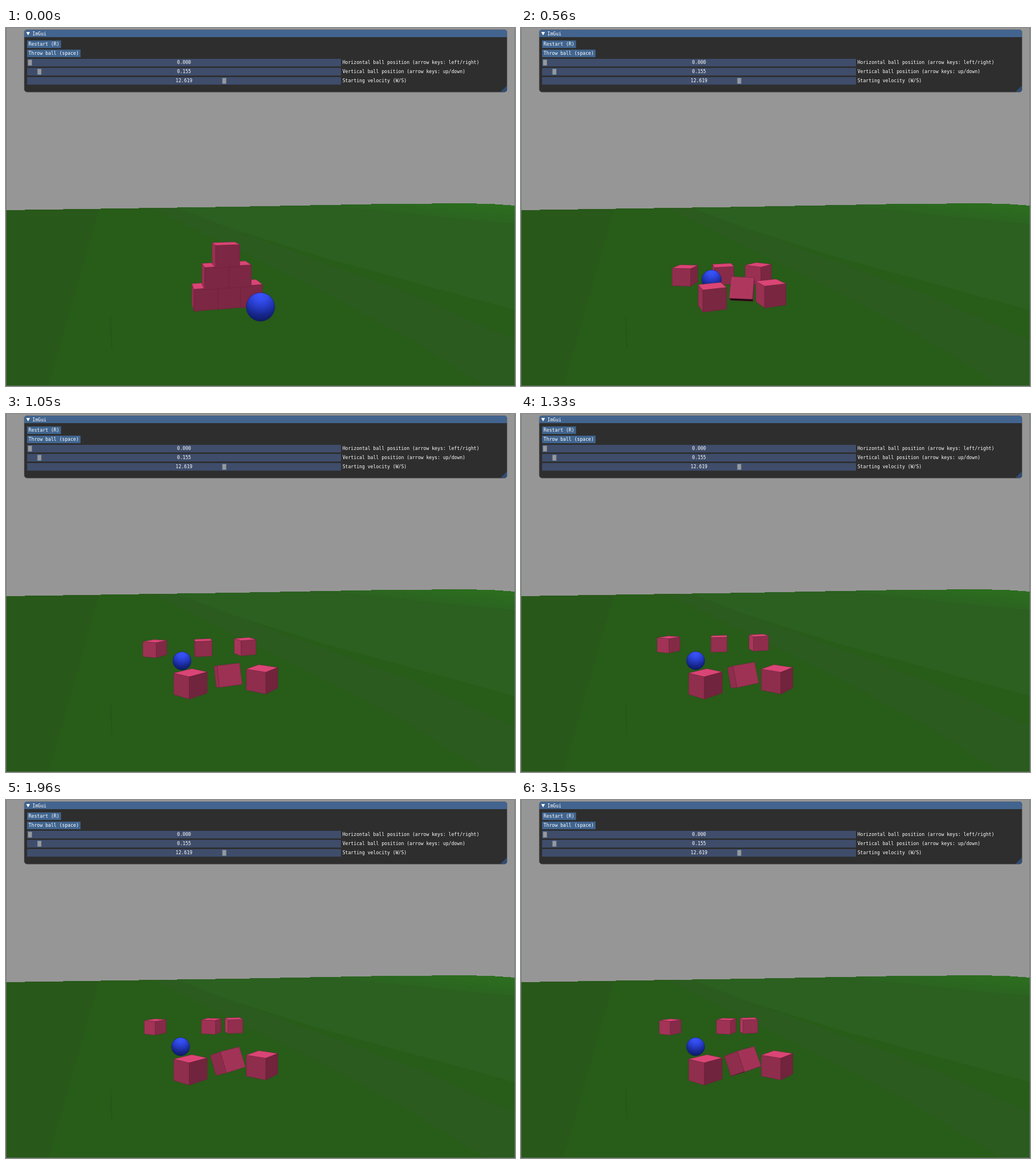
These frames come from a looping animation (892x627 px, 3.22 s). An HTML page with a canvas:

```html
<!DOCTYPE html>
<html lang="en">
<head>
<meta charset="utf-8">
<title>Ball and cubes</title>
<style>
  html, body { margin: 0; width: 100%; height: 100%; overflow: hidden; background: #969696; }
  svg, canvas { position: absolute; left: 0; top: 0; width: 892px; height: 627px; }
  text { font: 8.15px "DejaVu Sans Mono", "Liberation Mono", monospace; fill: #fff; white-space: pre; }
  .num { text-anchor: middle; }
  .button { fill: #41658f; }
  .track { fill: #3f4d6b; }
  .grab { fill: #999; stroke: #4a6c96; stroke-width: .7; }
</style>
</head>
<body>
<svg viewBox="0 0 892 627">
  <defs>
    <linearGradient id="hill" x1="0" y1="1" x2="1" y2="0">
      <stop offset=".35" stop-color="#2b6120"/>
      <stop offset="1" stop-color="#2c701f"/>
    </linearGradient>
  </defs>
  <rect width="892" height="627" fill="#969696"/>
  <g shape-rendering="crispEdges">
    <path fill="#285c19" d="M0 319L400 313L640 308.500L800 307L850 308L892 311V627H0Z"/>
    <path fill="#28581a" d="M0 319L163 317L75 627H0Z"/>
    <path fill="#2b6020" d="M290 315L400 313L640 308.500L800 307L892 311V494L560 403L400 353Z"/>
    <path fill="#2b5b1f" d="M258 316L300 315L400 353L560 412L720 470L892 547V627H840L700 540L560 465L400 387Z"/>
    <path fill="url(#hill)" d="M570 310L640 308.500L800 307L850 308L892 311V343L740 329Z"/>
  </g>
  <path stroke="#24521a" fill="none" d="M183.500 507L185.500 562"/>
  <path stroke="#65756a" stroke-opacity=".7" fill="none" d="M.5 0V626.500H891.500V0"/>

  <rect x="32" y="3" width="846" height="109.300" rx="5" fill="#2e2e2e" stroke="#555" stroke-width=".6"/>
  <path fill="#42648f" d="M32 16V8Q32 3 37 3H873Q878 3 878 8V16Z"/>
  <path fill="#fff" d="M35.500 7H42L38.750 13Z"/>
  <path fill="#304d73" d="M866.500 112L878 100.500V107.500Q878 112 873 112Z"/>
  <text x="46.300" y="12.700">ImGui</text>

  <rect class="button" x="37" y="21.800" width="59.400" height="13.200"/>
  <rect class="button" x="37" y="37.900" width="93.600" height="13.200"/>
  <text x="39.600" y="31.300">Restart (R)</text>
  <text x="39.600" y="47.300">Throw ball (space)</text>
  <g id="sliders"></g>
</svg>
<canvas id="scene" width="892" height="627"></canvas>

<script>
const sliders = [
  ['0.000', 38.6, 'Horizontal ball position (arrow keys: left/right)'],
  ['0.155', 55, 'Vertical ball position (arrow keys: up/down)'],
  ['12.619', 379, 'Starting velocity (W/S)']
];
document.getElementById('sliders').innerHTML = sliders.map(([value, grab, label], i) => `
  <g transform="translate(0 ${54 + i * 16})">
    <rect class="track" x="37" width="550" height="13.2"/>
    <rect class="grab" x="${grab}" y="1.4" width="7" height="10.4"/>
    <text class="num" x="312" y="9.3">${value}</text>
    <text x="589.7" y="9.3">${label}</text>
  </g>`).join('');

const ctx = document.getElementById('scene').getContext('2d');
const LOOP = 3220, STEP = 70;
const CX = 446, CY = 313, FOCAL = 560, UNIT = 40, FLAT = 0.91;
const HIT = 140, YAW = 17;

const progress = (t, from, to) => Math.min(1, Math.max(0, (t - from) / (to - from)));
const easeOut = (u, power) => 1 - (1 - u) ** power;
const mix = (a, b, u) => a + (b - a) * u;
const arc = u => 4 * u * (1 - u);
const ground = (x, z) => 3.81 - 0.03 * (x + 1.5) - 1.25 * (z - 1);

// Height of a thrown body above its resting place
function height(t, start, from, speed, gravity) {
  const s = Math.max(0, t - from) / 1000;
  return Math.max(0, start + speed * s - gravity * s * s);
}

// Lengths are in cube edges; z is the depth relative to UNIT pixels per edge.
function project(x, y, z) {
  const size = UNIT / z;
  return { x: CX + x * size, y: CY + y * size, size };
}

const stacked = (row, col) => ({
  x: -2.41 + 0.935 * (col + row / 2),
  z: 0.985 + 0.0075 * col - 0.01 * row,
  height: 0.92 * row
});

// Knocked away by the ball, sliding to rest along a bent path
function flung(row, col, end) {
  const start = stacked(row, col);
  return t => {
    const u = progress(t, HIT, 1960), slide = easeOut(u, 3);
    const x = mix(start.x, end.x, slide) + (end.bend || 0) * arc(u);
    const z = mix(start.z, end.z, easeOut(u, 2));
    const up = row && height(t, start.height, HIT, 1.6, 14);
    return {
      ...project(x, ground(x, z) - up, z),
      yaw: mix(YAW, end.yaw, slide) + (end.twist || 0) * arc(u)
    };
  };
}

// Pushed aside by the falling cubes
function nudged(col, end) {
  const start = stacked(0, col);
  return t => {
    const u = progress(t, 240, 840);
    const x = mix(start.x, end.x, u), z = mix(start.z, end.z, u);
    return { ...project(x, ground(x, z), z), yaw: mix(YAW, end.yaw, u ** 2.5) };
  };
}

// Tips forward off the top, lands on an edge and spins slowly
function toppled(t) {
  const start = stacked(2, 0);
  const u = progress(t, HIT, 620), settle = progress(t, 530, 3150);
  const x = start.x, z = mix(start.z, 1.025, u);
  const up = height(t, start.height, HIT, 1.6, 14);
  return {
    ...project(x, ground(x, z) - up - 0.08 * u, z),
    yaw: YAW * (1 - easeOut(u, 4)),
    pitch: mix(-90, -14, u),
    spin: 50 * easeOut(settle, 2),
    roll: mix(4 * u, -20, easeOut(settle, 3))
  };
}

function thrown(t) {
  const u = progress(t, 0, 1330);
  const x = mix(0, -4.375, easeOut(u, 2.5)), z = mix(0.8, 1.25, easeOut(u, 3));
  return project(x, 3.72 - height(t, 0.21, 0, 3.12, 6.25), z);
}

const cubes = [
  nudged(0, { x: -3, z: 0.98, yaw: 53 }),
  nudged(2, { x: 0.075, z: 1, yaw: 57 }),
  flung(0, 1, { x: -3.31, z: 1.54, yaw: -15, bend: -0.45, twist: 25 }),
  flung(1, 0, { x: -7.19, z: 1.56, yaw: -27 }),
  flung(1, 1, { x: -1.8, z: 1.54, yaw: YAW - 90, bend: 0.75 }),
  toppled
];

function turn(a, b, degrees) {
  const angle = degrees * Math.PI / 180, c = Math.cos(angle), s = Math.sin(angle);
  return [a * c - b * s, a * s + b * c];
}

function rotate([x, y, z], { spin = 0, pitch = 0, yaw = 0, roll = 0 }) {
  [x, z] = turn(x, z, spin);
  [y, z] = turn(y, z, pitch);
  [x, z] = turn(x, z, yaw);
  [x, y] = turn(x, y, roll);
  return [x, y, z];
}

const CORNERS = [[-1, -1], [1, -1], [1, 1], [-1, 1]];

function drawFace(pose, axis, side) {
  const place = (a, b) => {
    const v = [0, 0, 0];
    v[axis] = side;
    v[(axis + 1) % 3] = a;
    v[(axis + 2) % 3] = b;
    return rotate(v, pose);
  };
  const n = place(0, 0), half = pose.size / 2;
  const dx = pose.x - CX, dy = pose.y - CY;
  if (n[0] * dx + n[1] * dy + n[2] * FOCAL + half >= 0) return;

  ctx.beginPath();
  for (const [a, b] of CORNERS) {
    const p = place(a, b), zoom = FOCAL / (FOCAL + p[2] * half);
    ctx.lineTo(CX + (dx + p[0] * half) * zoom, CY + (dy + p[1] * half * FLAT) * zoom);
  }
  ctx.closePath();
  const haze = 0.007 * Math.max(0, UNIT - pose.size);
  const light = Math.min(1, 0.6 - 0.5 * n[1] - 0.1 * n[0] + haze);
  ctx.fillStyle = `rgb(${[218, 69, 117].map(c => Math.round(c * light))})`;
  ctx.fill();
  ctx.strokeStyle = 'rgba(105, 28, 60, .5)';
  ctx.lineWidth = 0.8;
  ctx.stroke();
}

function drawCube(pose) {
  for (let axis = 0; axis < 3; axis++) {
    drawFace(pose, axis, -1);
    drawFace(pose, axis, 1);
  }
}

function drawBall({ x, y, size }) {
  const r = size / 2;
  const shade = ctx.createRadialGradient(x, y - r * 0.85, 0, x, y - r * 0.85, r * 1.9);
  ['#3a54fa', '#324bea', '#2539c0', '#16268a', '#0d195e']
    .forEach((color, i) => shade.addColorStop(i / 4, color));
  ctx.beginPath();
  ctx.arc(x, y, r, 0, 7);
  ctx.fillStyle = shade;
  ctx.fill();
  ctx.strokeStyle = 'rgba(12, 22, 90, .6)';
  ctx.lineWidth = 0.8;
  ctx.stroke();
}

function draw(t) {
  ctx.clearRect(0, 0, 892, 627);
  const bodies = cubes.map(move => ({ pose: move(t), paint: drawCube }));
  bodies.push({ pose: thrown(t), paint: drawBall });
  bodies.sort((a, b) => a.pose.size - b.pose.size)
    .forEach(({ pose, paint }) => paint(pose));
}

const start = performance.now();
function tick() {
  const t = (performance.now() - start) % LOOP;
  draw(Math.floor(t / STEP) * STEP);
  requestAnimationFrame(tick);
}
tick();
</script>
</body>
</html>
```
